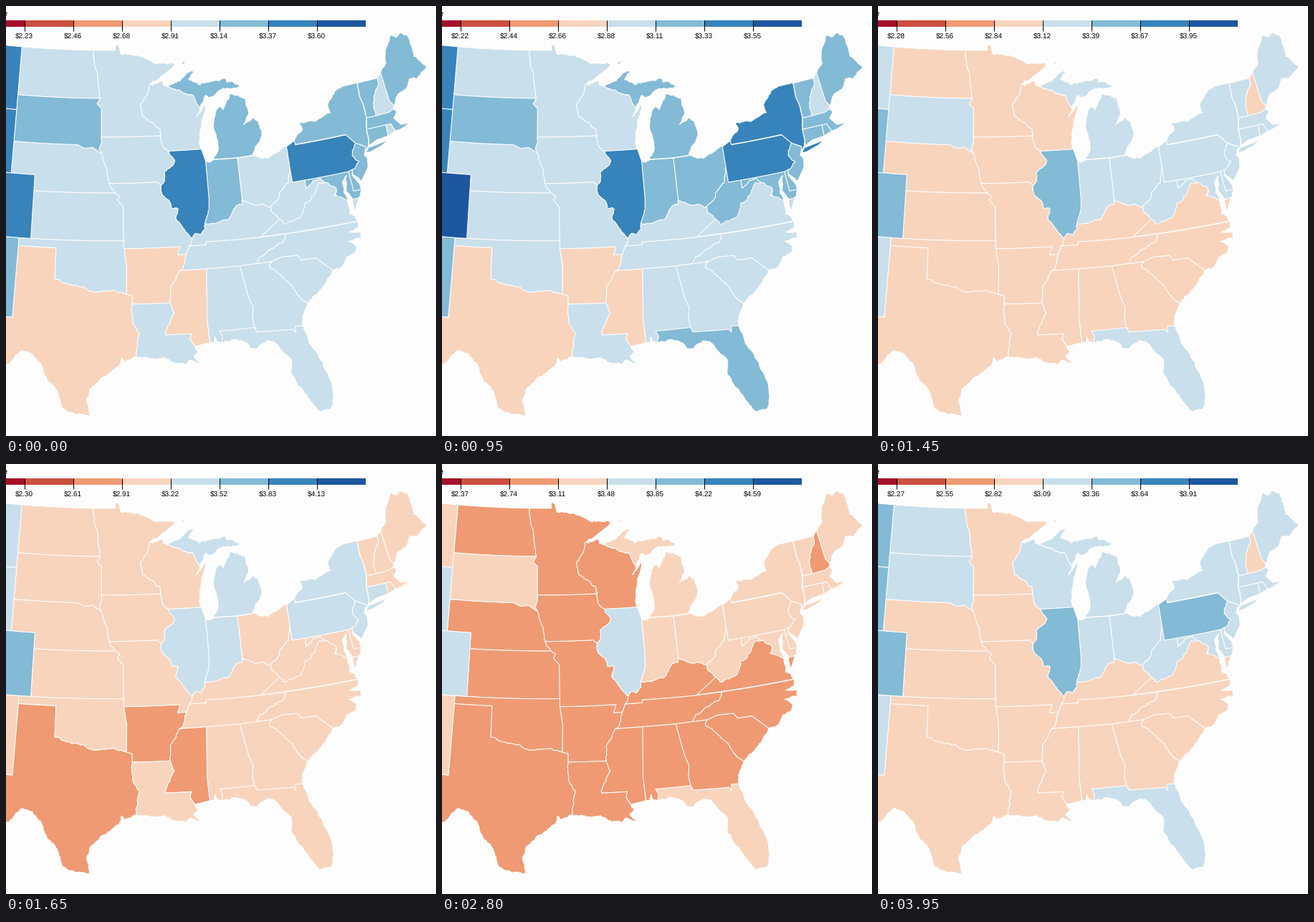
Recreate the animation shown at these times as a matplotlib script. Size 600 by 600 pixels, loop 4000 ms.

```python
import random

import matplotlib.pyplot as plt
import numpy as np
from matplotlib.animation import FuncAnimation
from matplotlib.collections import PolyCollection
from matplotlib.patches import Rectangle

FRAMES, STEP_MS = 80, 50
PX = 0.72  # points per pixel at 100 dpi
LOW = 2.0  # fixed lower end of the price scale
COLORS = ["#a50f2a", "#cb5040", "#ef9a73", "#f8d4bd",
          "#c9dfeb", "#83bad6", "#3783bb", "#1d579f"]

# Each state keeps its price; only the top of the scale moves
PRICES = {
    2.86: "TX AR MS", 2.95: "KS OK MO LA AL SC", 2.985: "TN",
    3.08: "NE MN IA KY GA NC VA NH", 3.1: "ND WI", 3.125: "OH FL WV RI",
    3.18: "NM SD DE MD MA VT ME", 3.27: "MI IN NJ CT", 3.33: "NY",
    3.38: "MT PA", 3.5: "WY IL", 3.56: "CO",
}
scale_top = np.poly1d(np.polyfit(
    [0, 0.6, 1.2, 1.65, 2.8, 3.5, 3.95],
    [3.825, 3.6184, 3.9776, 4.4368, 4.96, 4.6136, 4.1816], 6))

rng = random.Random(4)
borders = []


def refine(p, q, rough, depth=3):
    """Split p-q by midpoints, pushed sideways when rough."""
    if not depth:
        return [q]
    (x0, y0), (x1, y1) = p, q
    size = np.hypot(x1 - x0, y1 - y0) or 1
    k = rng.uniform(-rough, rough) * min(1, 0.4 / size)
    mid = ((x0 + x1) / 2 - k * (y1 - y0), (y0 + y1) / 2 + k * (x1 - x0))
    return refine(p, mid, rough, depth - 1) + refine(mid, q, rough, depth - 1)


def line(states, *lonlat, rough=0):
    """Border of the named states through degrees west and north."""
    pts = list(zip(lonlat[::2], lonlat[1::2]))
    path = pts[:1]
    for p, q in zip(pts, pts[1:]):
        path += refine(p, q, rough)
    borders.append((states.split(), path))


def wavy(states, *lonlat):
    """River or shore."""
    line(states, *lonlat, rough=0.16)


def project(lonlat):
    """Albers equal-area projection to stage pixels."""
    lon, lat = np.radians(np.array(lonlat)).T
    s1, s2 = np.sin(np.radians([29.5, 45.5]))
    n = (s1 + s2) / 2
    rho = np.sqrt(1 + s1 * s2 - 2 * n * np.sin(lat)) / n
    theta = n * (np.radians(96) - lon)
    return np.column_stack([139.7 + 1265 * rho * np.sin(theta),
                            -1332.6 + 1265 * rho * np.cos(theta)])


# Plains and mountains
line("MT", 109, 45, 109, 49, 104.05, 49)
line("MT ND", 104.05, 49, 104.05, 45.94)
line("MT SD", 104.05, 45.94, 104.05, 45)
line("MT WY", 104.05, 45, 109, 45)
line("WY", 109, 45, 109, 41)
line("WY SD", 104.05, 45, 104.05, 43)
line("WY NE", 104.05, 43, 104.05, 41)
line("WY CO", 104.05, 41, 109, 41)
line("CO", 109, 41, 109, 37)
line("CO NE", 104.05, 41, 102.05, 41, 102.05, 40)
line("CO KS", 102.05, 40, 102.05, 37)
line("CO OK", 102.05, 37, 103, 37)
line("CO NM", 103, 37, 109, 37)
line("NM", 109, 37, 109, 32)
line("NM OK", 103, 37, 103, 36.5)
line("NM TX", 103, 36.5, 103.06, 32, 109, 32)
line("ND", 104.05, 49, 97.23, 49)
wavy("ND MN", 97.23, 49, 97.13, 48.2, 96.85, 47.6, 96.56, 45.94)
line("ND SD", 104.05, 45.94, 96.56, 45.94)
line("SD MN", 96.56, 45.94, 96.85, 45.6, 96.45, 45.3, 96.45, 43.5)
wavy("SD IA", 96.45, 43.5, 96.45, 43.1, 96.64, 42.75, 96.45, 42.49)
line("SD NE", 104.05, 43, 98.5, 43, 97.9, 42.78, 97.2, 42.85, 96.45, 42.49)
wavy("NE IA", 96.45, 42.49, 96.1, 41.7, 95.85, 41, 95.77, 40.59)
wavy("NE MO", 95.77, 40.59, 95.31, 40)
line("NE KS", 102.05, 40, 95.31, 40)
line("KS MO", 95.31, 40, 94.9, 39.8, 95.1, 39.55, 94.61, 39.11, 94.62, 37)
line("KS OK", 102.05, 37, 94.62, 37)
line("MO OK", 94.62, 37, 94.62, 36.5)
line("AR OK", 94.62, 36.5, 94.43, 35.4, 94.48, 33.64)
line("TX OK", 103, 36.5, 100, 36.5, 100, 34.56)
wavy("TX OK", 100, 34.56, 99.2, 34.3, 98.1, 34.12, 97.2, 33.85, 95.5, 33.9,
     94.48, 33.64)
line("AR TX", 94.48, 33.64, 94.04, 33.55, 94.04, 33.02)
wavy("TX LA", 94.04, 33.02, 94.04, 32, 93.55, 31.2, 93.7, 30.4, 93.84, 29.7)
wavy("TX", 93.84, 29.7, 94.7, 29.35, 94.9, 29.65, 95.1, 29.1, 96.4, 28.35,
     97.2, 27.6, 97.4, 26.9, 97.15, 25.95, 98.2, 26.05, 99.1, 26.4,
     99.5, 27.5, 100.3, 28.3, 100.7, 29.1, 101.4, 29.77, 102.3, 29.88,
     103.2, 29, 104, 29.3, 109, 32)

# Upper Mississippi and the lakes
line("MN", 97.23, 49, 95.15, 49, 95.15, 49.38, 94.82, 49.3, 94.64, 48.74)
wavy("MN", 94.64, 48.74, 92.95, 48.62, 92, 48.3, 91.4, 48.07, 90.75, 48.1,
     89.6, 48, 90.9, 47.25, 92.1, 46.75)
line("MN IA", 96.45, 43.5, 91.22, 43.5)
wavy("MN WI", 91.22, 43.5, 91.25, 43.85, 92, 44.4, 92.8, 44.75, 92.88, 45.6,
     92.3, 46.1, 92.1, 46.75)
wavy("WI", 92.1, 46.75, 90.85, 46.95, 90.75, 46.65, 90.4, 46.56)
wavy("WI MI", 90.4, 46.56, 89.1, 46.13, 88.1, 45.9, 87.85, 45.35, 87.6, 45.1)
wavy("MI", 90.4, 46.56, 89.2, 46.85, 88.45, 47.35, 87.8, 47.47, 88.4, 46.9,
     87.4, 46.5, 86.1, 46.67, 85, 46.77, 84.9, 46.48, 84.4, 46.5, 83.5, 46.1,
     84.7, 46.05, 85.5, 46.08, 86.7, 45.65, 87, 45.8, 87.6, 45.1)
line("MI", 89.2, 47.87, 88.45, 48.18, 88.7, 47.95, 89.2, 47.87)
wavy("MI", 86.82, 41.76, 86.3, 42.4, 86.53, 43.65, 86.25, 44.7, 85.8, 45,
     85.55, 44.8, 85, 45.4, 84.75, 45.78, 83.45, 45.35, 83.35, 44.3,
     83.9, 43.7, 82.95, 44.07, 82.6, 43.85, 82.42, 43, 82.9, 42.4,
     83.45, 41.73)
wavy("WI", 87.6, 45.1, 88, 44.55, 87.05, 45.3, 87.55, 44.3, 87.7, 43.75,
     87.9, 43, 87.8, 42.49)
line("WI IL", 90.64, 42.51, 87.8, 42.49)
wavy("IA WI", 90.64, 42.51, 91.15, 42.9, 91.22, 43.5)
wavy("IA IL", 91.42, 40.38, 91.1, 40.7, 91.1, 41.2, 90.35, 41.6, 90.15, 41.9,
     90.64, 42.51)
line("IA MO", 95.77, 40.59, 91.73, 40.61, 91.42, 40.38)
wavy("MO IL", 91.42, 40.38, 91.4, 39.9, 90.73, 39.25, 90.67, 38.93,
     90.11, 38.85, 90.36, 38.24, 89.5, 37.3, 89.13, 36.98)
line("IL", 87.8, 42.49, 87.53, 41.71)
line("IN", 87.53, 41.71, 87.2, 41.62, 86.82, 41.76)
line("MI IN", 86.82, 41.76, 84.81, 41.7)
line("MI OH", 84.81, 41.7, 83.45, 41.73)
line("IL IN", 87.53, 41.71, 87.53, 39.35)
wavy("IL IN", 87.53, 39.35, 87.6, 38.7, 88.05, 37.8)
line("IN OH", 84.81, 41.7, 84.82, 39.1)
wavy("OH", 83.45, 41.73, 82.7, 41.5, 82.2, 41.45, 81.2, 41.77, 80.52, 41.98)

# Ohio valley
wavy("IL KY", 88.05, 37.8, 88.07, 37.5, 88.45, 37.15, 88.95, 37.2,
     89.13, 36.98)
wavy("IN KY", 88.05, 37.8, 87.1, 37.8, 86.5, 37.95, 86.05, 38, 85.75, 38.3,
     85.4, 38.72, 84.85, 38.8, 84.82, 39.1)
wavy("OH KY", 84.82, 39.1, 84.2, 38.8, 83.7, 38.63, 83.2, 38.62, 82.6, 38.42)
line("OH PA", 80.52, 41.98, 80.52, 40.64)
wavy("OH WV", 80.52, 40.64, 80.87, 39.7, 81.7, 39.2, 81.75, 38.93,
     82.2, 38.6, 82.6, 38.42)
wavy("KY WV", 82.6, 38.42, 82.6, 38.15, 81.97, 37.54)
line("KY VA", 81.97, 37.54, 83.68, 36.6)
line("KY TN", 89.42, 36.5, 88.07, 36.5, 88.07, 36.68, 83.68, 36.6)
wavy("MO KY", 89.13, 36.98, 89.42, 36.5)
wavy("MO TN", 89.42, 36.5, 89.7, 36)
line("AR MO", 94.62, 36.5, 90.15, 36.5, 90.38, 36, 89.7, 36)

# South
wavy("AR TN", 89.7, 36, 90.08, 35.1, 90.3, 35)
wavy("AR MS", 90.3, 35, 90.6, 34.6, 91.1, 33.9, 91.17, 33)
line("AR LA", 94.04, 33.02, 91.17, 33)
wavy("LA MS", 91.17, 33, 90.9, 32.4, 91.63, 31)
line("LA MS", 91.63, 31, 89.73, 31, 89.84, 30.65, 89.53, 30.18)
wavy("LA", 93.84, 29.7, 92.6, 29.55, 91.8, 29.6, 91.2, 29.25, 90.2, 29.1,
     89.9, 29.35, 89.2, 29.05, 89.65, 29.6, 89.3, 29.85, 89.53, 30.18)
line("MS", 89.53, 30.18, 88.4, 30.35)
line("TN MS", 90.3, 35, 88.2, 35)
line("MS AL", 88.2, 35, 88.47, 31.9, 88.4, 30.35)
line("TN AL", 88.2, 35, 85.61, 34.98)
line("AL", 88.4, 30.35, 88.1, 30.35, 88, 30.7, 87.9, 30.4, 87.52, 30.28)
line("AL FL", 85, 31, 87.6, 31, 87.4, 30.65, 87.52, 30.28)
line("AL GA", 85.61, 34.98, 85.18, 32.86, 84.95, 32.3, 85.1, 31.6, 85, 31)
line("TN GA", 85.61, 34.98, 84.32, 34.99)
line("NC GA", 84.32, 34.99, 83.11, 35)
wavy("SC GA", 83.11, 35, 83.35, 34.7, 82.75, 34.2, 81.95, 33.45, 81.4, 32.6,
     80.88, 32.05)
line("GA FL", 85, 31, 84.86, 30.7, 82.21, 30.57, 82.05, 30.36, 82, 30.75,
     81.45, 30.71)
wavy("GA", 80.88, 32.05, 81.4, 31.3, 81.45, 30.71)
wavy("FL", 81.45, 30.71, 81.2, 29.7, 80.55, 28.4, 80.05, 26.85, 80.2, 25.5,
     80.4, 25.2, 81.1, 25.13, 81.75, 25.95, 82.1, 26.6, 82.75, 27.7,
     82.65, 28.7, 83.7, 29.95, 84.2, 30.08, 85, 29.65, 85.4, 29.7,
     85.7, 30.1, 86.5, 30.38, 87.52, 30.28)
line("FL", 81.8, 24.55, 81, 24.7, 81.3, 24.7, 81.8, 24.55)
wavy("TN NC", 81.68, 36.59, 82, 36.1, 83.1, 35.75, 84, 35.4, 84.32, 34.99)
line("TN VA", 83.68, 36.6, 81.68, 36.59)
line("NC SC", 83.11, 35, 82.3, 35.2, 81.04, 35.15, 80.8, 34.82, 79.67, 34.8,
     78.55, 33.86)
wavy("SC", 78.55, 33.86, 79.2, 33.2, 79.9, 32.65, 80.88, 32.05)
line("VA NC", 81.68, 36.59, 75.87, 36.55)
wavy("NC", 75.87, 36.55, 76, 36.15, 76.7, 36, 75.8, 35.85, 75.9, 35.5,
     76.9, 35.45, 76.4, 35.1, 76.55, 34.7, 77.3, 34.5, 77.92, 33.9,
     78.55, 33.86)

# Mid-Atlantic
wavy("VA WV", 81.97, 37.54, 81.68, 37.2, 80.3, 37.5, 79.8, 38.3, 79.3, 38.4,
     78.85, 38.8, 78.35, 39.4, 77.72, 39.32)
wavy("MD VA", 77.72, 39.32, 77.05, 38.85, 77.3, 38.4, 76.95, 38.3, 76.35, 38)
wavy("VA", 76.35, 38, 76.3, 37.5, 76.4, 37.1, 76, 36.9, 75.87, 36.55)
line("VA", 75.95, 37.9, 75.35, 38, 75.95, 37.15, 75.95, 37.9)
line("PA WV", 80.52, 40.64, 80.52, 39.72, 79.48, 39.72)
wavy("MD WV", 79.48, 39.72, 79.48, 39.2, 78.8, 39.6, 78.2, 39.65,
     77.72, 39.32)
line("PA MD", 79.48, 39.72, 75.79, 39.72)
line("MD DE", 75.79, 39.72, 75.7, 38.46, 75.05, 38.45)
wavy("MD", 75.05, 38.45, 75.25, 38.03, 75.85, 37.95, 76.3, 38.6, 76.15, 39.1,
     76, 39.5, 76.45, 39.15, 76.5, 38.5, 76.35, 38)
line("PA DE", 75.79, 39.72, 75.42, 39.8)
line("DE", 75.42, 39.8, 75.55, 39.45, 75.1, 38.8, 75.05, 38.45)
wavy("PA NJ", 74.69, 41.36, 75.1, 40.95, 75.2, 40.65, 74.75, 40.2,
     75.42, 39.8)
line("NJ", 73.9, 41, 74.2, 40.5, 74, 40.3, 74.1, 39.75, 74.9, 38.95,
     75.1, 39.2, 75.5, 39.5, 75.42, 39.8)
line("NY NJ", 74.69, 41.36, 73.9, 41)
line("NY PA", 79.76, 42.27, 79.76, 42, 75.35, 42, 74.69, 41.36)
line("PA", 80.52, 41.98, 79.76, 42.27)
wavy("NY", 79.76, 42.27, 78.9, 42.85, 79.05, 43.27, 77.5, 43.25, 76.2, 43.55,
     76.3, 44.1, 75.3, 44.85, 74.7, 45)
line("NY", 74.7, 45, 73.34, 45.01)
line("NY", 73.66, 41, 74, 40.7, 73.9, 41)
line("NY", 74, 40.6, 73.7, 40.87, 72.6, 40.98, 71.9, 41.07, 72.5, 40.82,
     73.6, 40.59, 74, 40.6)

# New England
line("NY VT", 73.34, 45.01, 73.4, 44.1, 73.25, 43.55, 73.26, 42.75)
line("NY MA", 73.26, 42.75, 73.5, 42.05)
line("NY CT", 73.5, 42.05, 73.52, 41.3, 73.66, 41)
line("VT", 73.34, 45.01, 71.5, 45.01)
wavy("VT NH", 71.5, 45.01, 71.6, 44.5, 72.05, 44.1, 72.4, 43.4, 72.46, 42.73)
line("VT MA", 73.26, 42.75, 72.46, 42.73)
line("NH", 71.5, 45.01, 71.08, 45.3)
line("NH ME", 71.08, 45.3, 70.97, 43.4, 70.7, 43.08)
line("NH", 70.7, 43.08, 70.82, 42.87)
line("NH MA", 72.46, 42.73, 71.25, 42.74, 70.82, 42.87)
wavy("ME", 71.08, 45.3, 70.4, 45.75, 70.25, 46.3, 70, 46.7, 69.22, 47.46,
     68.9, 47.2, 68.3, 47.35, 67.79, 47.07, 67.79, 45.7, 66.98, 44.8,
     68.2, 44.3, 68.8, 44.4, 69.1, 44, 70.2, 43.6, 70.7, 43.08)
line("MA CT", 73.5, 42.05, 71.8, 42.02)
line("MA RI", 71.8, 42.02, 71.38, 42.02, 71.12, 41.5)
line("MA", 70.82, 42.87, 70.6, 42.65, 71, 42.3, 70.55, 41.8, 70.05, 41.78,
     70.2, 42.07, 69.95, 41.7, 70.65, 41.53, 71.12, 41.5)
line("CT RI", 71.8, 42.02, 71.86, 41.32)
line("CT", 71.86, 41.32, 72.9, 41.25, 73.66, 41)
line("RI", 71.12, 41.5, 71.86, 41.32)


def rings(state):
    """Join the borders of a state into closed outlines."""
    left = [path for names, path in borders if state in names]
    while left:
        ring = list(left.pop(0))
        while ring[0] != ring[-1]:
            nxt = next(b for b in left if ring[-1] in (b[0], b[-1]))
            left.remove(nxt)
            ring += nxt[1:] if nxt[0] == ring[-1] else nxt[-2::-1]
        yield project(ring)


plt.rcParams["text.hinting"] = "none"
fig = plt.figure(figsize=(6, 6), dpi=100, facecolor="#fdfdfd")
ax = fig.add_axes([0, 0, 1, 1])
ax.set(xlim=(0, 600), ylim=(600, 0))
ax.axis("off")

areas = []
for price, names in PRICES.items():
    for name in names.split():
        area = PolyCollection(list(rings(name)), edgecolors="white",
                              linewidths=PX, joinstyle="round")
        ax.add_collection(area, autolim=False)
        areas.append((area, price))

labels = []
for i, color in enumerate(COLORS):
    x = 25.5 + 68 * i
    ax.add_patch(Rectangle((x - 68, 19.6), 68, 9.4, color=color, lw=0))
    if i < 7:
        ax.plot([x, x], [19.6, 34.6], color="black", lw=PX, zorder=3,
                solid_capstyle="butt")
        labels.append(ax.text(x, 45.4, "", family="Liberation Sans",
                              size=10 * PX, ha="center", va="baseline"))
ax.text(2, 15, "e", family="Liberation Sans", size=11 * PX, ha="right",
        va="baseline")


def update(i):
    step = (scale_top(i * STEP_MS / 1000) - LOW) / len(COLORS)
    for k, label in enumerate(labels, 1):
        label.set_text(f"\\${LOW + k * step:.2f}")
    for area, price in areas:
        band = int((price - LOW) / step)
        area.set_facecolor(COLORS[min(band, len(COLORS) - 1)])
    return labels + [area for area, _ in areas]


anim = FuncAnimation(fig, update, frames=FRAMES, interval=STEP_MS,
                     repeat=True, repeat_delay=0)
plt.show()
```
